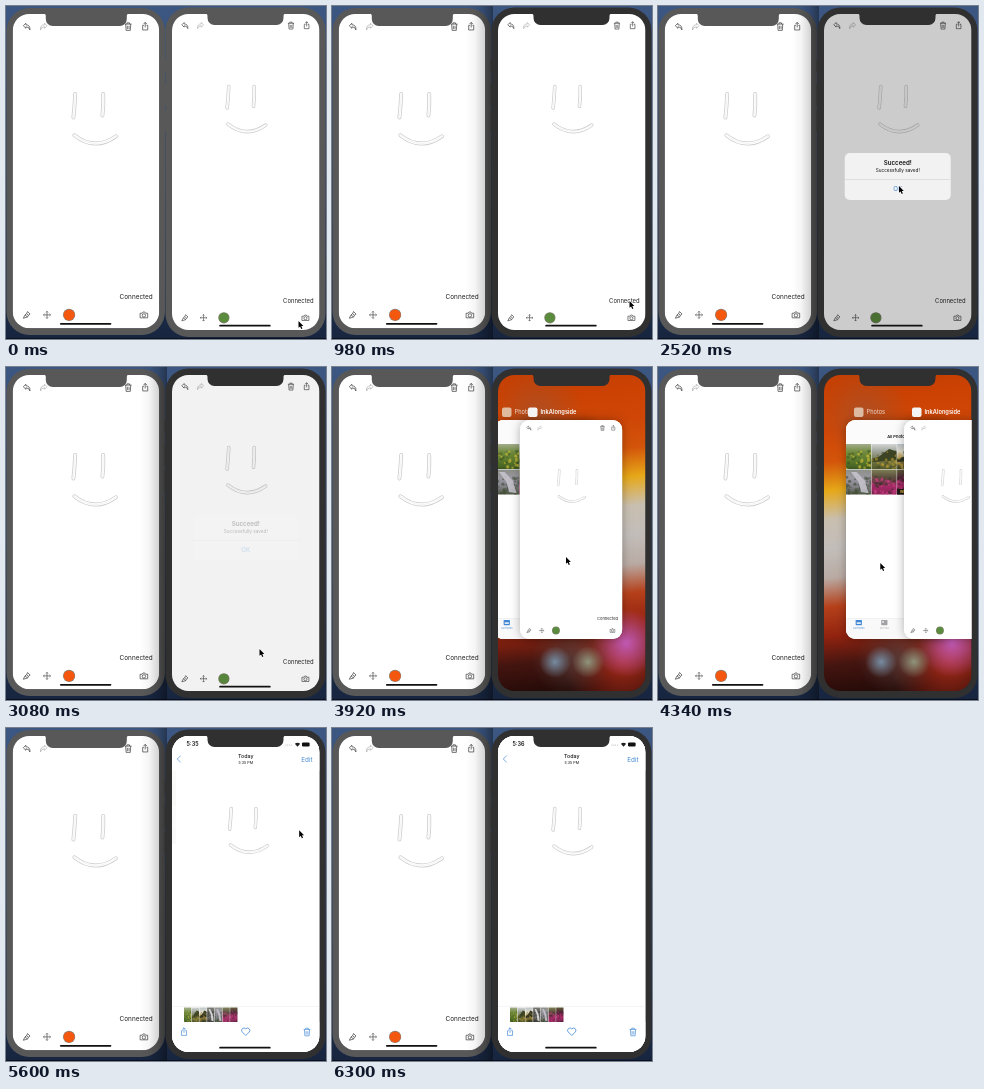
Animation of 320x333 px, one loop 6510 ms. Source, as an HTML page with a canvas:

```html
<!DOCTYPE html>
<html lang="en">
<head>
<meta charset="utf-8">
<title>Shared drawing</title>
<style>
html, body { margin: 0; width: 100%; height: 100%; overflow: hidden; }
canvas { display: block; width: 320px; height: 333px; }
</style>
</head>
<body>
<canvas id="stage" width="320" height="333"></canvas>
<script>
const ctx = document.getElementById('stage').getContext('2d');
const LOOP = 6510, STEP = 70;
const BLUE = '#3f87d6', CARD = 0.693;
const LEFT = { x: 6.7, y: 8, w: 146.5, h: 314.2 };
const RIGHT = { x: 166, y: 8, w: 147.5, h: 316 };

const ICONS = {
  undo: 'M-1-4L-4-1L-1 2V.3Q3 .2 3.8 4Q4.4-2-1-2.2Z',
  redo: 'M1-4L4-1L1 2V.3Q-3 .2-3.8 4Q-4.4-2 1-2.2Z',
  trash: 'M-4-3H4M-1.5-3V-4.5H1.5V-3M-3-3L-2.5 4.5H2.5L3-3M-1-1V3M1-1V3',
  share: 'M-1.5-1.5H-3V4H3V-1.5H1.5M0 1V-5M-2-3L0-5L2-3',
  brush: 'M-4 4L-2 0L1 2.5L-4 4M-2 0L0-1.5L1-4L4-1L2 .5L1 2.5M0-1.5L2 .5',
  move: 'M-4 0H4M0-4V4M-1.2-3L0-4.3L1.2-3M-1.2 3L0 4.3L1.2 3M-3-1.2L-4.3 0L-3 1.2M3-1.2L4.3 0L3 1.2',
  camera: 'M-4.5-2H-2L-1-3.5H1L2-2H4.5V3.5H-4.5ZM2 .6A2 2 0 1 1-2 .6A2 2 0 1 1 2 .6',
  heart: 'M0 4L-3.6 .4A2.3 2.3 0 0 1 0-2.6A2.3 2.3 0 0 1 3.6 .4Z',
  back: 'M2-4L-2 0L2 4',
  search: 'M2-1A3 3 0 1 1-4-1A3 3 0 1 1 2-1M1.2 1.2L4 4'
};
const INK = new Path2D('M62.5 80Q62 92 60.7 103.5M90.5 80Q91 91 89.7 101.5M61.7 121.2Q82 137.3 103.2 122.3');
const ARROW = new Path2D('M0 0V7.6L1.8 6L3 8.8L4.3 8.2L3.1 5.5H5.4Z');

// Vertical tones, accent colour, dark colour, motif
const PHOTOS = [
  [['#a3ac8c', '#6f8a3c', '#5c7a2c', '#3f5b20'], '#c9b93a', '#33491c', 'leaves'],
  [['#d3d6d6', '#9a9f94', '#6e7440', '#55592a'], '#b89a35', '#3d4424', 'hill'],
  [['#b9c3c8', '#e2dccb', '#8f7c3c', '#343a1c'], '#c9a444', '#2f3320', 'hill'],
  [['#7b7a74', '#5f5d57', '#6b6a66', '#45443f'], '#e6e9ec', '#37352f', 'fall'],
  [['#8b8f86', '#9b98a2', '#85848c', '#4c5640'], '#c9c6d0', '#3f4a33', 'fall'],
  [['#7d7f55', '#5a4a3c', '#a62a66', '#8a2455'], '#cf3f86', '#2c3320', 'leaves'],
  [['#5f5a38', '#4c2433', '#a82a66', '#6d1f47'], '#c93a80', '#231f18', 'love']
];

const lerp = (a, b, u) => a + (b - a) * u;
const ramp = (t, a, b) => Math.min(1, Math.max(0, (t - a) / (b - a)));
const ease = (t, a, b) => { const u = ramp(t, a, b); return u * u * (3 - 2 * u); };
const noise = n => Math.abs(Math.sin(n) * 437) % 1;

function group(x, y, scale, draw, alpha = 1) {
  if (alpha <= 0) return;
  ctx.save();
  ctx.globalAlpha *= alpha;
  ctx.translate(x, y);
  ctx.scale(scale, scale);
  draw();
  ctx.restore();
}

function box(x, y, w, h, r, fill) {
  ctx.beginPath();
  ctx.roundRect(x, y, w, h, r);
  if (fill) { ctx.fillStyle = fill; ctx.fill(); }
}

function disc(x, y, r, fill) {
  ctx.beginPath();
  ctx.arc(x, y, r, 0, 7);
  ctx.fillStyle = fill;
  ctx.fill();
}

function text(s, x, y, size, color = '#111', align = 'center', weight = 400) {
  ctx.font = `${weight} ${size}px Inter, sans-serif`;
  ctx.textAlign = align;
  ctx.fillStyle = color;
  ctx.fillText(s, x, y);
}

function icon(name, x, y, color = '#333', scale = 0.85) {
  group(x, y, scale, () => {
    ctx.strokeStyle = color;
    ctx.lineWidth = 0.8;
    ctx.stroke(new Path2D(ICONS[name]));
  });
}

function gradient(x0, y0, x1, y1, colors) {
  const g = ctx.createLinearGradient(x0, y0, x1, y1);
  colors.forEach((c, i) => g.addColorStop(i / (colors.length - 1), c));
  return g;
}

function drawing(scale = 0.908) {
  group(0, 0, scale, () => {
    ctx.lineCap = 'round';
    for (const [width, color] of [[3.9, '#cacaca'], [2.4, '#fff'], [0.6, '#ececea']]) {
      ctx.lineWidth = width;
      ctx.strokeStyle = color;
      ctx.stroke(INK);
    }
  });
}

function app({ w, h }, s, color) {
  box(0, 0, w, h, 0, '#fff');
  drawing(s === 1 ? 1 : undefined);
  const top = 12.6 * s, bar = h - 13.3 * s, size = 0.84 * s;
  icon('undo', 14 * s, top, '#333', size);
  icon('redo', 31 * s, top, '#aaa', size);
  icon('trash', w - 31 * s, top, '#333', size);
  icon('share', w - 14 * s, top, '#333', size);
  text('Connected', w - 6.5 * s, h - 29 * s, 6.4 * s, '#222', 'right');
  icon('brush', 14 * s, bar, '#333', size);
  icon('move', 34.3 * s, bar, '#444', size);
  disc(56.4 * s, bar, 6.1 * s, '#8a8078');
  disc(56.4 * s, bar, 5.5 * s, color);
  icon('camera', w - 15.3 * s, bar, '#333', size);
}

function shape(fill, ...points) {
  ctx.beginPath();
  points.forEach(([x, y]) => ctx.lineTo(x, y));
  ctx.fillStyle = fill;
  ctx.fill();
}

function photo(i, x, y, w, h) {
  const [tones, accent, dark, motif] = PHOTOS[i];
  ctx.save();
  box(x, y, w, h, 0, gradient(0, y, 0, y + h, tones));
  ctx.clip();
  ctx.translate(x, y);
  ctx.scale(w, h);
  if (motif === 'hill') shape(dark, [0, 0.6], [0.3, 0.5], [0.7, 0.2], [1, 0.3], [1, 0.65], [0, 0.72]);
  for (let n = 0; n < 44; n++) {
    ctx.globalAlpha = n % 2 ? 0.45 : 0.6;
    const fill = n % 2 || motif === 'fall' ? dark : accent;
    disc(noise(n * 12.9 + i), 0.3 + 0.7 * noise(n * 78.2 + i), 0.03 + 0.04 * noise(n), fill);
  }
  ctx.globalAlpha = 0.85;
  if (motif === 'fall') shape(accent, [0.2, 0.1], [0.42, 0.1], [0.75, 0.45], [0.9, 0.95], [0.6, 0.9], [0.5, 0.5]);
  ctx.restore();
  if (motif === 'love' && w > 20) {
    box(x, y + h - 8, w, 8, 0, '#1c1812');
    text('LOVE', x + w * 0.7, y + 6.5, 5.2, '#f2ecd0', 'center', 800);
    text('with smile', x + w / 2, y + h - 2, 5.6, '#d9a93c', 'center', 700);
  }
}

function library() {
  const { w, h } = RIGHT, cell = w / 4;
  box(0, 0, w, h, 0, '#fff');
  box(0, 0, w, 34.5, 0, '#fbfbfb');
  text('All Photos', w / 2, 25.8, 5.8, '#111', 'center', 600);
  text('Select', w - 7, 25.8, 6.1, BLUE, 'right');
  PHOTOS.forEach((_, i) =>
    photo(i, (i % 4) * cell, 34.5 + Math.floor(i / 4) * cell, cell - 0.6, cell - 0.6));
  box(0, 286, w, h - 286, 0, '#f9f9f9');
  box(0, 286, w, 0.5, 0, '#d8d8d8');
  ['All Photos', 'For You', 'Albums', 'Search'].forEach((label, i) => {
    const x = (i + 0.5) * cell, color = i ? '#a2a2a2' : BLUE;
    if (i === 3) icon('search', x, 292.5, color);
    else {
      box(x - 4.5, 288.5, 9, 7.5, 1, color);
      box(x - 3, i === 1 ? 290 : 292, i === 1 ? 2.5 : 6, 2.5, 0, i === 2 ? '#bbb' : '#dfe8f2');
    }
    text(label, x, 302.3, 3.5, color);
  });
}

// The saved picture grows from its thumbnail to the whole screen.
function viewer(u) {
  const { w, h } = RIGHT, cell = w / 4, k = lerp(0.248, 1, u);
  group(0, 0, 1, () => box(0, 0, w, h, 0, '#fff'), u);
  ctx.save();
  box(lerp(cell * 3, 0, u), lerp(34.5 + cell, 0, u), w * k, lerp(cell, h, u), 0, '#fff');
  ctx.clip();
  group(lerp(cell * 3, 0, u), lerp(50.5, 0, u), k, () => drawing());
  ctx.restore();
  group(0, 0, 1, () => {
    icon('back', 7, 23, BLUE);
    text('Today', w / 2, 22, 5.3, '#111', 'center', 500);
    text('5:35 PM', w / 2, 28, 3.7);
    text('Edit', w - 7, 25.6, 6.3, BLUE, 'right');
    box(0, 270.5, w, 0.5, 0, '#ebebeb');
    PHOTOS.forEach((_, i) => photo(i, 12 + i * 7.7, 271.5, 7.3, 14.5));
    icon('share', 12, 296, BLUE);
    icon('heart', w / 2, 295.5, BLUE, 1);
    icon('trash', w - 12.5, 296, BLUE);
  }, u);
}

function statusBar(time) {
  text(time, 20.5, 10.2, 5.5, '#111', 'center', 600);
  for (let i = 0; i < 4; i++) disc(114 + i * 1.8, 9, 0.5, '#aaa');
  ctx.beginPath();
  ctx.moveTo(125.5, 10.8);
  ctx.arc(125.5, 10.8, 4, -2.3, -0.84);
  ctx.fillStyle = '#222';
  ctx.fill();
  box(130, 6.4, 7.6, 4, 1.2, '#111');
}

function alertBox() {
  const { w, h } = RIGHT, mid = w / 2;
  box(0, 0, w, h, 0, 'rgba(0,0,0,.2)');
  box(mid - 53, 139, 106, 47, 5, '#f2f2f2');
  text('Succeed!', mid, 150.5, 6.2, '#111', 'center', 600);
  text('Successfully saved!', mid, 157.5, 4.7, '#111');
  box(mid - 53, 165, 106, 0.5, 0, '#ccc');
  text('OK', mid, 176.5, 6.2, BLUE);
}

function wallpaper() {
  const { w, h } = RIGHT;
  box(0, 0, w, h, 0, gradient(0, 0, 35, h,
    ['#c43f03', '#cb4203', '#cf4606', '#d3540a', '#e6a818', '#c9bfb0', '#c2bdb9',
      '#b9aba4', '#b5401a', '#92230f', '#451510', '#260b08']));
  const glow = (x, y, r, color) => {
    const g = ctx.createRadialGradient(x, y, 0, x, y, r);
    g.addColorStop(0, color);
    g.addColorStop(1, color.slice(0, 7) + '00');
    box(0, 0, w, h, 0, g);
  };
  glow(40, 38, 45, '#96583a88');
  glow(125, 285, 60, '#b02c18ee');
  glow(128, 268, 34, '#c45cc0ee');
  glow(73, 282, 40, '#5a4a4899');
  glow(57, 287, 16, '#7d9bb4dd');
  glow(90, 287, 16, '#96a488dd');
}

function card(x, y, k, draw) {
  group(x, y, k, () => {
    ctx.shadowColor = 'rgba(0,0,0,.3)';
    ctx.shadowBlur = 10;
    box(0, 0, RIGHT.w, RIGHT.h, 14, '#fff');
    ctx.shadowColor = 'transparent';
    ctx.clip();
    draw();
  });
}

function label(name, x, color, weight, alpha) {
  group(x, 37.5, 1, () => {
    box(8, -5, 9.5, 9.5, 2, color);
    text(name, 20.5, 1.8, 5.7, '#fff', 'left', weight);
  }, alpha);
}

function switcher(t) {
  const lift = ease(t, 3570, 3920), swipe = ease(t, 4060, 4300), open = ease(t, 4480, 4830);
  const appX = 22 * lift + 58 * swipe + 130 * open;
  const libX = lerp(lerp(lerp(-90, -4, lift), 22, swipe), 0, open);
  wallpaper();
  card(libX, lerp(45, 0, open), lerp(CARD, 1, open), library);
  card(appX, 45 * lift, lerp(1, CARD, lift), () => app(RIGHT, 0.92, '#5b8c3e'));
  label('Photos', libX, '#e8d8c4', 400, 0.8 * lift * (1 - open));
  label('InkAlongside', appX, '#f4f4f4', 600, lift * (1 - open));
}

function rightScreen(t) {
  if (t < 3570) {
    app(RIGHT, 0.92, '#5b8c3e');
    group(0, 0, 1, alertBox, ramp(t, 2030, 2240) * (1 - ramp(t, 2870, 3150)));
    return;
  }
  if (t < 4830) return switcher(t);
  library();
  viewer(ease(t, 5290, 5640));
  statusBar(t < 6000 ? '5:35' : '5:36');
}

function notch(x, y, w, h, fill) {
  const r = 7, f = 2.5, end = x + w;
  ctx.beginPath();
  ctx.moveTo(x - f, y);
  ctx.arcTo(x, y, x, y + f, f);
  ctx.arcTo(x, y + h, x + r, y + h, r);
  ctx.arcTo(end, y + h, end, y, r);
  ctx.arcTo(end, y, end + f, y, f);
  ctx.fillStyle = fill;
  ctx.fill();
}

function phone(screen, outer, cut, bezel, draw, indicator) {
  const { x, y, w, h } = screen;
  box(...outer, 23, bezel);
  ctx.save();
  box(x, y, w, h, 16.5);
  ctx.clip();
  group(x, y, 1, draw);
  ctx.restore();
  notch(...cut, bezel);
  if (indicator) box(x + 47.2, y + h - 5.3, 51.5, 1.9, 1, '#111');
}

function cursor(t) {
  const path = [
    [0, 292.5, 315], [420, 297, 310], [840, 298, 310], [980, 297.5, 295], [1400, 268, 220],
    [1960, 253, 190], [2380, 241, 180], [2800, 241, 180], [3080, 253.5, 282], [3360, 242, 315],
    [3570, 242, 315], [3920, 234, 190], [4060, 206, 196], [4300, 222.3, 196], [4500, 222.3, 196],
    [4970, 282.5, 152.5], [5220, 294, 98], [5500, 294, 98], [6000, 286, 140]
  ];
  const i = path.findIndex(p => p[0] > t);
  if (i < 1) return;
  const [a, b] = [path[i - 1], path[i]], u = ease(t, a[0], b[0]);
  group(lerp(a[1], b[1], u), lerp(a[2], b[2], u), 0.9, () => {
    ctx.strokeStyle = '#fff';
    ctx.lineWidth = 1.2;
    ctx.stroke(ARROW);
    ctx.fillStyle = '#000';
    ctx.fill(ARROW);
  });
}

function render(t) {
  const focused = t >= 770;
  const bezel = focused ? '#303030' : '#585858';
  box(0, 0, 320, 333, 0, gradient(0, 0, 0, 333, ['#3c5782', '#2f4569', '#17253f']));
  box(0, 332, 320, 1, 0, '#0a1020');
  phone(LEFT, [0.5, 2, 158.5, 327], [39.8, 7.5, 81, 12.5], '#585858',
    () => app(LEFT, 1, '#f4580f'), true);
  if (focused) {
    box(134, 0, 27, 333, 0, gradient(134, 0, 161, 0,
      ['rgba(0,0,0,0)', 'rgba(0,0,0,.04)', 'rgba(0,0,0,.16)', 'rgba(0,0,0,.38)']));
  }
  for (const [y, h] of [[53, 13], [78, 21], [104, 21]]) box(158.5, y, 2, h, 1, bezel);
  phone(RIGHT, [159.5, 1.5, 160, 329.5], [201.5, 7.5, 76, 11.5], bezel,
    () => rightScreen(t), t < 3570 || t >= 4830);
  cursor(t);
}

function tick() {
  const t = performance.now() % LOOP;
  render(Math.min(6300, Math.floor(t / STEP) * STEP));
  requestAnimationFrame(tick);
}
tick();
</script>
</body>
</html>
```
